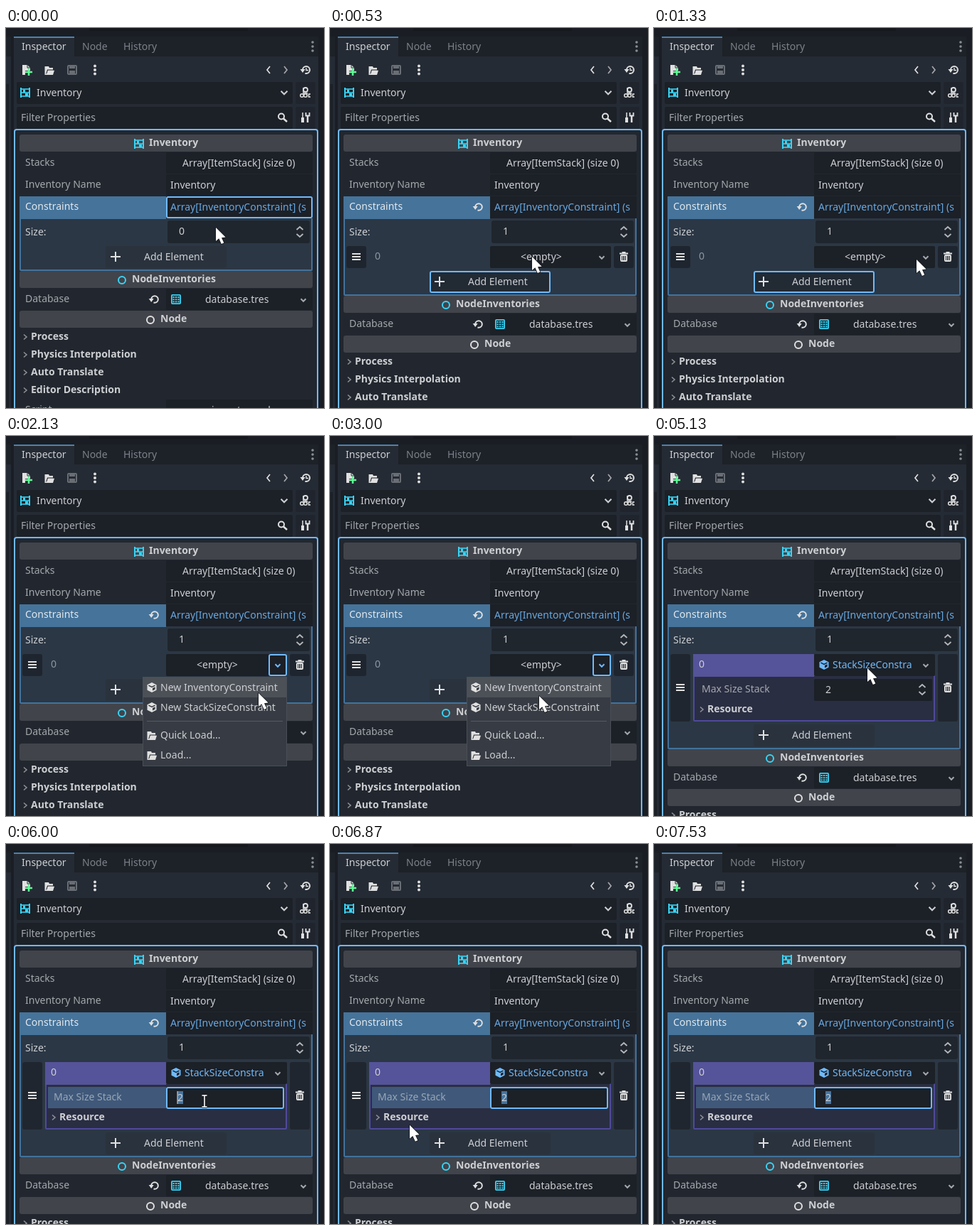
An HTML page with a canvas that plays this animation: 447x535 px, repeating every 8.07 s.

```html
<!DOCTYPE html>
<html lang="en">
<head>
<meta charset="utf-8">
<title>Inspector</title>
<style>
html, body { margin: 0; width: 100%; height: 100%; overflow: hidden; background: #1a1e24; }
canvas { display: block; width: 447px; height: 535px; }
</style>
</head>
<body>
<canvas id="stage"></canvas>
<script>
const W = 447, H = 535, LOOP = 8070, STEP = 200 / 3;
const canvas = document.getElementById('stage');
const c = canvas.getContext('2d');
const dpr = window.devicePixelRatio || 1;
canvas.width = W * dpr;
canvas.height = H * dpr;

const TEXT = '#cdcfd2', LABEL = '#a4a8ad', DIM = '#7d8289', ICON = '#e0e0e0';
const ACCENT = '#70bafa', CYAN = '#37d4f5', FIELD = '#1c2027', INNER = '#22272f';
const PANEL = '#252b34', BACK = '#1a1e24';

// Pointer path: step, x, y
const path = [
  [0, 295, 281], [3, 283, 322], [7, 283, 322], [20, 369, 326], [23, 376, 327],
  [27, 376, 327], [32, 355, 362], [36, 325, 382], [40, 293, 362], [42, 293, 362],
  [45, 294, 366], [54, 302, 387], [68, 302, 387], [74, 300, 327], [78, 300, 327],
  [84, 279, 359], [89, 279, 359], [90, 279, 362], [96, 279, 362], [106, 66, 405],
  [109, 66, 405], [113, 52, 548], [122, 52, 548]
];

function slope(i, k) {
  const a = path[i - 1], p = path[i], b = path[i + 1];
  if (!a || !b || a[k] === p[k] || b[k] === p[k]) return 0;
  if ((p[k] - a[k]) * (b[k] - p[k]) < 0) return 0;
  return (b[k] - a[k]) / (b[0] - a[0]);
}

function pointer(n) {
  let i = 0;
  while (i < path.length - 2 && path[i + 1][0] <= n) i++;
  const a = path[i], b = path[i + 1], d = b[0] - a[0], u = (n - a[0]) / d;
  const u2 = u * u, u3 = u2 * u;
  return [1, 2].map(k =>
    (2 * u3 - 3 * u2 + 1) * a[k] + (u3 - 2 * u2 + u) * d * slope(i, k) +
    (3 * u2 - 2 * u3) * b[k] + (u3 - u2) * d * slope(i + 1, k));
}

function box(x, y, x2, y2, fill, r = 0) {
  c.fillStyle = fill;
  c.beginPath();
  c.roundRect(x, y, x2 - x, y2 - y, r);
  c.fill();
}

function frame(x, y, x2, y2, color, w = 2, r = 2) {
  c.strokeStyle = color;
  c.lineWidth = w;
  c.beginPath();
  c.roundRect(x + w / 2, y + w / 2, x2 - x - w, y2 - y - w, r);
  c.stroke();
}

// Text is placed by its left edge and the middle of its capitals
function text(s, x, mid, color = TEXT, bold = false) {
  c.font = (bold ? 'bold ' : '') + '14px "Noto Sans", "Open Sans", sans-serif';
  c.fillStyle = color;
  c.fillText(s, x, mid + 5);
}

function clipped(s, x, mid, right, color) {
  c.save();
  c.beginPath();
  c.rect(x, mid - 15, right - x, 30);
  c.clip();
  text(s, x, mid, color);
  c.restore();
}

function line(points, color = ICON, w = 2) {
  c.strokeStyle = color;
  c.lineWidth = w;
  c.beginPath();
  for (let i = 0; i < points.length; i += 2) c.lineTo(points[i], points[i + 1]);
  c.stroke();
}

function poly(points, fill) {
  c.fillStyle = fill;
  c.beginPath();
  for (let i = 0; i < points.length; i += 2) c.lineTo(points[i], points[i + 1]);
  c.closePath();
  c.fill();
}

function ring(x, y, r, color, w = 2) {
  c.strokeStyle = color;
  c.lineWidth = w;
  c.beginPath();
  c.arc(x, y, r, 0, 7);
  c.stroke();
}

function dots(x, y, gap, r, color) {
  c.fillStyle = color;
  for (const d of [-gap, 0, gap]) {
    c.beginPath();
    c.arc(x, y + d, r, 0, 7);
    c.fill();
  }
}

const down = (x, y, color = '#b4b7bb', s = 4) => line([x - s, y - s / 2, x, y + s / 2, x + s, y - s / 2], color, 2);
const right = (x, y) => line([x - 2, y - 3.5, x + 2, y, x - 2, y + 3.5], '#8d9197', 1.6);

function spin(x, y) {
  line([x - 4.5, y - 3, x, y - 7, x + 4.5, y - 3], '#b4b7bb', 1.8);
  line([x - 4.5, y + 3, x, y + 7, x + 4.5, y + 3], '#b4b7bb', 1.8);
}

function revert(x, y, r = 4.8) {
  c.strokeStyle = ICON;
  c.lineWidth = 2;
  c.beginPath();
  c.arc(x + 1, y, r, Math.PI, Math.PI * 2.6);
  c.stroke();
  poly([x - r - 2.5, y - 1, x - r + 4.5, y - 1, x - r + 1, y + 4], ICON);
}

function cube(x, y, color, gap) {
  poly([x, y - 7, x + 6.5, y - 3.7, x + 6.5, y + 3.7, x, y + 7, x - 6.5, y + 3.7, x - 6.5, y - 3.7], color);
  line([x - 4.6, y - 2.8, x, y - .5, x + 4.6, y - 2.8], gap, 1.4);
  poly([x + 1, y + 1, x + 4.6, y - .8, x + 4.6, y + 2.7, x + 1, y + 4.6], gap);
}

function folder(x, y, gap) {
  poly([x - 6.5, y - 6, x - 1, y - 6, x, y - 4, x + 5, y - 4, x + 5, y + 6, x - 6.5, y + 6], ICON);
  poly([x - 4.8, y + 4.5, x - 3, y - 1.5, x + 5, y - 1.5, x + 5, y - .3, x - 2, y - .3, x - 3.7, y + 4.5], gap);
  poly([x - 2, y - .2, x + 7, y - .2, x + 5, y + 6, x - 4, y + 6], ICON);
}

function shelf(x, y) {
  box(x - 7, y - 7, x - 5, y + 7, CYAN);
  box(x + 5, y - 7, x + 7, y + 7, CYAN);
  for (const d of [-5, 0, 5]) box(x - 6, y + d - .8, x + 6, y + d + .8, CYAN);
  box(x - 3, y - 4, x, y, CYAN);
  box(x, y + 1, x + 4, y + 5, CYAN);
}

function table(x, y) {
  frame(x - 7, y - 7, x + 7, y + 7, CYAN, 1.8, 1);
  for (let i = 0; i < 3; i++) for (let j = 0; j < 3; j++) {
    box(x - 4.5 + i * 3.4, y - 4 + j * 3.2, x - 2.2 + i * 3.4, y - 2 + j * 3.2, CYAN);
  }
}

function trash(x, y) {
  box(x - 6, y - 5.5, x + 6, y - 3.5, ICON);
  box(x - 2.5, y - 7, x + 2.5, y - 5, ICON);
  frame(x - 5, y - 3, x + 5, y + 7, ICON, 2, 1);
  box(x - 2, y - 1, x - .8, y + 5, ICON);
  box(x + .8, y - 1, x + 2, y + 5, ICON);
}

function handle(x, y) {
  for (const d of [-5, -1, 3]) box(x - 6, y + d, x + 6, y + d + 2, ICON);
}

function chrome() {
  box(0, 0, W, H, BACK);
  box(117, 0, 340, 4, '#15181d');
  box(0, 12, 7, 40, '#1d2128');
  box(0, 40, 7, H, PANEL);
  box(0, 79, 4, H, FIELD);
  box(11, 12, 439, 40, '#1d2128');
  box(11, 40, 439, H, PANEL);
  box(11, 12, 96, 41, PANEL);
  box(11, 12, 96, 14, '#4e81ad');
  text('Inspector', 22, 26);
  text('Node', 107, 26, DIM);
  text('History', 165, 26, DIM);
  dots(431, 26, 6, 1.8, '#8a8e94');

  poly([23, 52, 30, 52, 34, 56, 34, 66, 23, 66], ICON);
  line([30, 52, 30, 56, 34, 56], PANEL, 1);
  box(27, 60, 37, 67, PANEL);
  line([32, 57, 32, 67], '#5fff97', 2.5);
  line([27, 62, 37, 62], '#5fff97', 2.5);
  folder(61, 60, PANEL);
  frame(86, 52, 100, 66, '#696e75', 2, 1);
  box(89, 53, 97, 57, '#696e75');
  box(89, 60, 97, 66, '#696e75');
  dots(125, 59, 5.5, 2, ICON);
  line([371, 54, 367, 59, 371, 64], ICON, 1.7);
  line([391, 54, 395, 59, 391, 64], '#a5a8ac', 1.7);
  revert(421, 59, 5);
  line([422, 56, 422, 59.5, 425, 59.5], ICON, 1.4);

  box(15, 76, 403, 107, FIELD, 2);
  shelf(27, 91);
  text('Inventory', 43, 91);
  down(391, 91, TEXT, 4.5);
  box(407, 76, 435, 107, '#20252d', 2);
  ring(421, 87, 3, ICON, 1.8);
  line([418, 84, 418, 92, 424, 92], ICON, 1.4);
  ring(416, 95, 2.3, ICON, 1.5);
  ring(421, 95, 2.3, ICON, 1.5);
  line([428, 93, 425.5, 93, 425.5, 97, 428, 97], ICON, 1.5);

  box(15, 111, 403, 142, FIELD, 2);
  text('Filter Properties', 21, 126, LABEL);
  ring(387, 124.5, 4, ICON, 2);
  line([390, 127.5, 395, 132], ICON, 2.5);
  box(407, 111, 435, 142, '#20252d', 2);
  line([417, 119, 417, 126], ICON, 1.5);
  line([417, 126, 417, 133], ICON, 4);
  line([424, 124, 424, 133], ICON, 2.5);
  line([421.5, 119, 421.5, 123.5, 426.5, 123.5, 426.5, 119], ICON, 1.8);
}

function category(name, x, y) {
  box(19, y - 12, 431, y + 12, '#41444b', 3);
  text(name, x, y - 1, TEXT, true);
}

function lower(dy, py) {
  category('NodeInventories', 177, 354 + dy);
  ring(163, 355 + dy, 5, CYAN);
  box(225, 367 + dy, 431, 397 + dy, FIELD, 2);
  text('Database', 27, 381 + dy, LABEL);
  revert(208, 382 + dy);
  table(239, 382 + dy);
  text('database.tres', 280, 382 + dy);
  down(418, 383 + dy, '#a4a8ad', 3.5);
  category('Node', 217, 410 + dy);
  ring(203, 411 + dy, 5, ICON);
  ['Process', 'Physics Interpolation', 'Auto Translate', 'Editor Description'].forEach((s, i) => {
    const y = 434 + dy + i * 25;
    if (py > y - 12 && py < y + 12) box(19, y - 12, 431, y + 12, '#303640');
    right(27, y + 1);
    text(s, 35, y, TEXT, true);
  });
  if (dy === 0) {
    box(225, 523, 431, H, FIELD);
    text('Script', 27, 537, LABEL);
    text('inventory.gd', 289, 538);
  }
}

function addButton(y, hover, focus) {
  box(140, y - 15, 310, y + 16, hover ? '#35414f' : focus ? '#222a34' : '#2a323d', 3);
  if (focus) frame(140, y - 15, 310, y + 16, ACCENT);
  line([147, y, 161, y]);
  line([154, y - 7, 154, y + 7]);
  text('Add Element', 194, y);
}

function element(n) {
  const open = n >= 77, set = n >= 65;
  const bottom = open ? 402 : 338, mid = open ? 354 : 322;
  box(23, 307, 51, bottom, open ? '#20262f' : '#1e252e', 3);
  handle(37, mid);
  box(399, 307, 427, bottom, open ? '#20262f' : '#1e252e', 3);
  trash(413, mid);
  if (open) {
    box(55, 307, 395, 402, '#2a2e42', 2);
    frame(55, 336, 395, 402, '#50499a', 2, 1);
    box(55, 307, 225, 339, '#555399');
  }
  text('0', 63, 321, open ? TEXT : '#8d969f');
  box(225, 307, 395, 338, FIELD, 2);
  if (set) {
    cube(239, 322, open ? ACCENT : ICON, FIELD);
    clipped('StackSizeConstraint', 251, 322, 363, open ? ACCENT : TEXT);
  } else {
    text('<empty>', 268, 322);
  }
  const focus = n >= 21 && !open;
  if (focus) frame(369, 307, 395, 338, ACCENT);
  down(382, 323, n >= 22 && !set ? ACCENT : '#a4a8ad', 3.5);
  if (open) maxSize(n);
}

function maxSize(n) {
  const focus = n >= 87, edit = n >= 90;
  if (focus) box(59, 342, 225, 372, '#40597a');
  text('Max Size Stack', 67, 356, focus ? '#98a6b6' : LABEL);
  box(225, 342, 391, 373, FIELD, 2);
  if (edit) box(241, 348, 249, 366, '#47749c');
  text('2', 241, 357);
  if (edit && n < 99) box(240.5, 348, 241.5, 366, ICON);
  if (!edit) spin(377, 357);
  if (focus) frame(225, 342, 391, 373, ACCENT);
  right(67, 385);
  text('Resource', 75, 384, TEXT, true);
}

function inspector(n, px, py) {
  const dy = n >= 77 ? 99 : n >= 8 ? 35 : 0;
  box(11, 142, 439, H, INNER, 3);
  category('Inventory', 201, 162);
  shelf(187, 163);
  box(225, 175, 431, 205, FIELD, 2);
  text('Stacks', 27, 189, LABEL);
  text('Array[ItemStack] (size 0)', 248, 190);
  box(225, 206, 431, 236, FIELD, 2);
  text('Inventory Name', 27, 220, LABEL);
  text('Inventory', 231, 221);

  box(19, 268, 431, 342 + dy, '#2b3745');
  frame(19, 266, 431, 342 + dy, '#42729b', 2, 1);
  box(19, 237, 225, 269, '#45739a');
  box(225, 237, 431, 268, FIELD);
  text('Constraints', 27, 251, '#e3e8ec');
  clipped('Array[InventoryConstraint] (size ' + (n < 8 ? 0 : 1) + ')', 231, 252, 422.5, '#67a9e3');
  if (n < 8) frame(225, 237, 431, 268, ACCENT);
  else revert(208, 252);

  text('Size:', 27, 287);
  box(227, 271, 427, 303, '#20262e', 3);
  text(n < 8 ? '0' : '1', 243, 286);
  spin(413, 287);
  if (n >= 8) element(n);
  const ay = 322 + dy;
  const over = n < 21 && px > 140 && px < 310 && Math.abs(py - ay) < 15;
  addButton(ay, over, n >= 8 && n < 21);
  lower(dy, py);
  frame(11, 142, 439, H + 10, ACCENT, 2, 3);
}

function popup(py) {
  const bg = '#373b43', lit = '#4c5057';
  box(192, 339, 395, 465, '#4a4f57');
  box(193, 340, 394, 464, bg);
  const top = py >= 368 ? 368 : 340;
  if (py >= 340 && py < 396) box(193, top, 394, top + 28, lit);
  ['New InventoryConstraint', 'New StackSizeConstraint'].forEach((s, i) => {
    const y = 354 + i * 28;
    cube(205, y, ICON, bg);
    text(s, 217, y);
  });
  box(198, 401, 389, 402, '#565b63');
  ['Quick Load...', 'Load...'].forEach((s, i) => {
    const y = 421 + i * 28;
    folder(205, y + 1, bg);
    text(s, 217, y);
  });
}

function arrow(x, y) {
  const shape = [0, 0, 0, 19, 4.3, 15.3, 7.8, 23, 11.3, 21.5, 8, 14.2, 13.6, 13.6];
  c.save();
  c.translate(x, y);
  c.beginPath();
  for (let i = 0; i < shape.length; i += 2) c.lineTo(shape[i], shape[i + 1]);
  c.closePath();
  c.lineJoin = 'round';
  c.strokeStyle = '#15181c';
  c.lineWidth = 1.6;
  c.stroke();
  c.fillStyle = '#fff';
  c.fill();
  c.restore();
}

function beam(x, y) {
  for (const [color, w] of [['#15181c', 3.4], ['#fff', 1.6]]) {
    line([x, y - 8, x, y + 8], color, w);
    line([x - 3.5, y - 8, x + 3.5, y - 8], color, w);
    line([x - 3.5, y + 8, x + 3.5, y + 8], color, w);
  }
}

function draw(now) {
  const n = Math.floor((now % LOOP + 4) / STEP);
  const [x, y] = pointer(n);
  c.setTransform(dpr, 0, 0, dpr, 0, 0);
  chrome();
  inspector(n, x, y);
  if (n >= 22 && n < 65) popup(y);
  if (n >= 90 && x > 225 && y < 373) beam(x, y);
  else arrow(x, y);
}

const start = performance.now();
function tick() {
  draw(performance.now() - start);
  requestAnimationFrame(tick);
}
tick();
</script>
</body>
</html>
```
